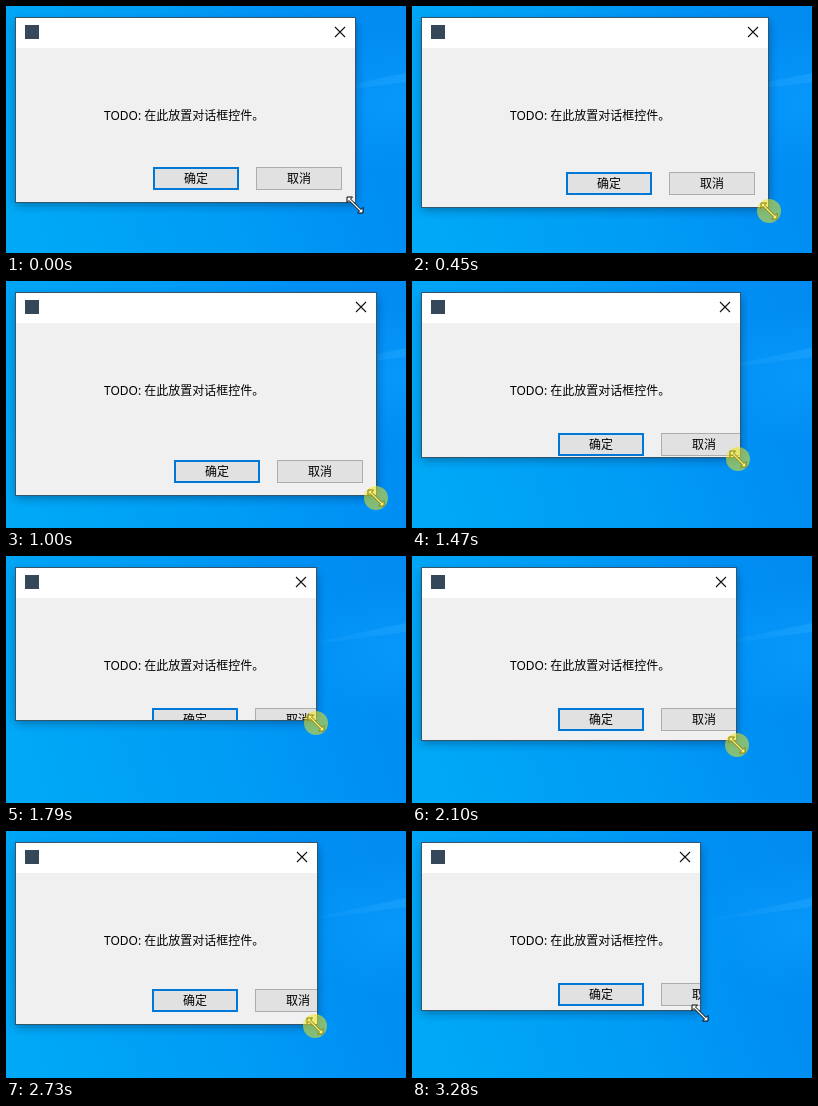
Write an HTML page that moves like this. It is 400x247 px and loops after 3590 ms.

```html
<!DOCTYPE html>
<html lang="zh-CN">
<head>
<meta charset="utf-8">
<title>Dialog resize</title>
<style>
html, body { margin: 0; width: 100%; height: 100%; overflow: hidden; background: #00a0f5; }
svg { display: block; width: 100vw; height: 100vh; }
text { font: 12px "Noto Sans", "Noto Sans CJK SC", "Noto Sans CJK", sans-serif; fill: #000; }
.label { text-anchor: middle; }
</style>
</head>
<body>
<svg viewBox="0 0 400 247">
  <defs>
    <linearGradient id="sky" x1="0" y1="0.6" x2="1" y2="0.4">
      <stop offset="0" stop-color="#00a8f6"/>
      <stop offset="0.5" stop-color="#009cf5"/>
      <stop offset="0.8" stop-color="#0090f4"/>
      <stop offset="1" stop-color="#028cf2"/>
    </linearGradient>
    <radialGradient id="glow">
      <stop offset="0" stop-color="#0a9cff" stop-opacity="0.7"/>
      <stop offset="1" stop-color="#0a9cff" stop-opacity="0"/>
    </radialGradient>
    <linearGradient id="ray" x1="0" x2="1">
      <stop offset="0" stop-color="#30b0ff" stop-opacity="0"/>
      <stop offset="1" stop-color="#30b0ff" stop-opacity="0.35"/>
    </linearGradient>
    <filter id="blur" x="-20%" y="-20%" width="140%" height="140%">
      <feGaussianBlur stdDeviation="5"/>
    </filter>
    <clipPath id="client"><rect id="clip" x="10" y="42"/></clipPath>
  </defs>

  <rect width="400" height="247" fill="url(#sky)"/>
  <ellipse cx="400" cy="95" rx="120" ry="70" fill="url(#glow)"/>
  <path d="M280 92L400 67V76Z" fill="url(#ray)"/>

  <rect id="shadow" x="10" y="16" fill="#001c3c" opacity="0.42" filter="url(#blur)"/>
  <rect id="frame" x="9" y="11" fill="#34566c"/>
  <rect id="bar" x="10" y="12" height="30" fill="#fff"/>
  <rect id="body" x="10" y="42" fill="#f0f0f0"/>
  <rect x="19" y="19" width="14" height="14" fill="#34485a"/>
  <path id="close" d="M-5-5L5 5M5-5L-5 5" stroke="#111" stroke-width="1.1"/>

  <g clip-path="url(#client)">
    <text x="98" y="114">TODO: 在此放置对话框控件。</text>
    <g id="ok">
      <rect x="1" y="1" width="84" height="21" fill="#e1e1e1" stroke="#0078d7" stroke-width="2"/>
      <text class="label" x="43" y="16">确定</text>
    </g>
    <g id="cancel">
      <rect x="0.5" y="0.5" width="85" height="22" fill="#e1e1e1" stroke="#adadad"/>
      <text class="label" x="43" y="16">取消</text>
    </g>
  </g>

  <g id="cursor">
    <path d="M-8-8H-2.5L-4.5-6L6 4.5L8 2.5V8H2.5L4.5 6L-6-4.5L-8-2.5Z" fill="#fff" stroke="#000"/>
    <circle id="press" r="12" fill="#f0e614" fill-opacity="0.54"/>
  </g>
</svg>
<script>
const LOOP = 3590, STEP = 80, PRESS = 290, RELEASE = 3280;

// each drag eases the window's corner to (x, y); px and py set how early it slows
const drags = [
  { from: 450, to: 770, x: 375, y: 219, px: 1.55, py: 1.25 },
  { from: 920, to: 1000, x: 371, y: 215, px: 1, py: 1 },
  { from: 1310, to: 1790, x: 311, y: 165, px: 2.2, py: 2.55 },
  { from: 2020, to: 2340, x: 346, y: 214, px: 1, py: 1 },
  { from: 2570, to: 2960, x: 289, y: 180, px: 1.3, py: 1.3 }
];

const $ = id => document.getElementById(id);
const move = (id, x, y) => $(id).setAttribute("transform", `translate(${x} ${y})`);
const size = (id, w, h) => {
  $(id).setAttribute("width", w);
  if (h !== undefined) $(id).setAttribute("height", h);
};
const easeOut = (k, power) => 1 - (1 - k) ** power;

function corner(t) {
  let x = 350, y = 197;
  for (const d of drags) {
    if (t < d.from) break;
    const steps = Math.round((d.to - d.from) / STEP) + 1;
    const k = Math.min(1, (Math.floor((t - d.from) / STEP) + 1) / steps);
    x += (d.x - x) * easeOut(k, d.px);
    y += (d.y - y) * easeOut(k, d.py);
  }
  return [Math.round(x), Math.round(y)];
}

function draw(t) {
  const [right, bottom] = corner(t);
  const inner = right - 11;
  size("shadow", right - 10, bottom - 14);
  size("frame", right - 9, bottom - 11);
  size("bar", inner);
  size("body", inner, bottom - 43);
  size("clip", inner, bottom - 43);
  move("close", right - 16, 26);

  // buttons follow the corner but stop at the dialog's minimum layout
  const x = Math.max(249, right - 100), y = Math.max(152, bottom - 36);
  move("ok", x - 103, y);
  move("cancel", x, y);

  // the pointer runs slightly ahead of the window
  const [nextX, nextY] = corner(t + STEP);
  const lead = (now, next) => Math.round(now + 0.2 * (next - now));
  move("cursor", lead(right, nextX) - 1, lead(bottom, nextY) + 2);
  $("press").style.display = t >= PRESS && t < RELEASE ? "" : "none";
}

const start = performance.now();
function tick(now) {
  draw(Math.max(0, now - start) % LOOP);
  requestAnimationFrame(tick);
}
draw(0);
requestAnimationFrame(tick);
</script>
</body>
</html>
```
